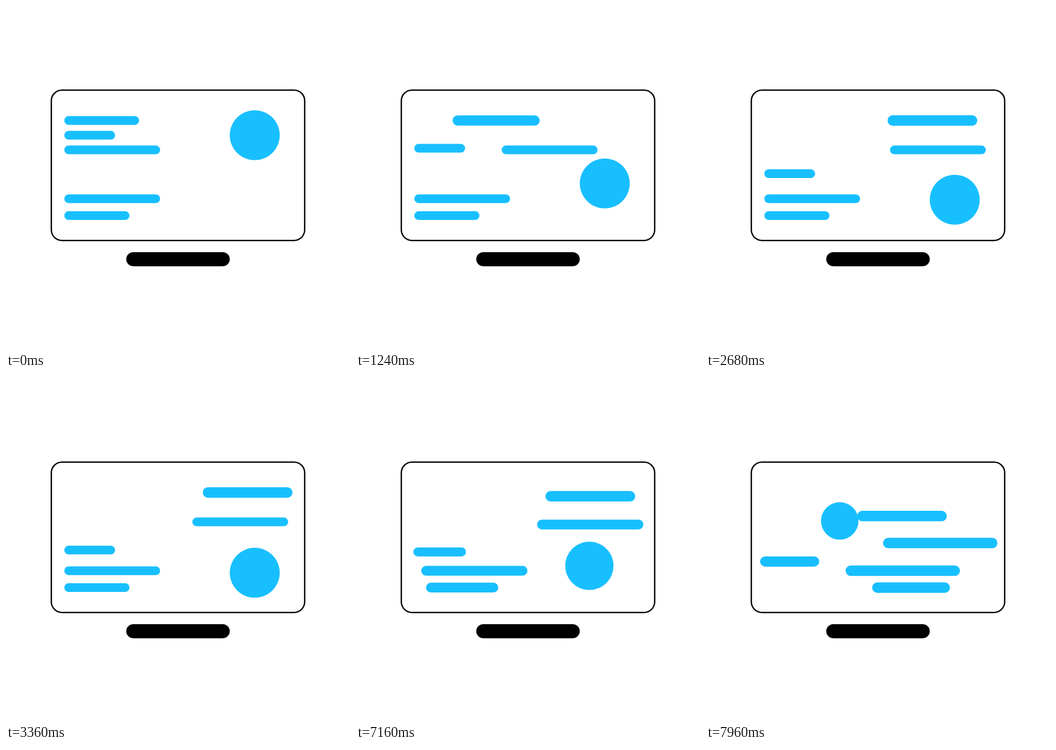
Recreate the animation shown at these times as an HTML page with a canvas. Size 640 by 640 pixels, loop 8000 ms.

```html
<!DOCTYPE html>
<html lang="en">
<head>
<meta charset="utf-8">
<title>Screen layout</title>
<style>
  html, body { margin: 0; width: 100%; height: 100%; overflow: hidden; background: #fff; }
  canvas { display: block; width: 640px; height: 640px; }
</style>
</head>
<body>
<canvas id="stage" width="640" height="640"></canvas>
<script>
const ctx = document.getElementById('stage').getContext('2d');
const LOOP = 8000;
const BLUE = '#18bfff';
const BAR_H = 16.3;

// Five uneven ticks repeat every 560 ms.
const PERIOD = 560;
const TICKS = [0, 120, 260, 300, 440];

function stepAt(ms) {
  const rest = ms % PERIOD;
  return Math.floor(ms / PERIOD) * 5 + TICKS.filter(t => t <= rest).length - 1;
}

// Cubic easing with control points (1/3, 0) and (x2, 1).
function ease(x2) {
  return p => {
    if (p <= 0) return 0;
    if (p >= 1) return 1;
    let lo = 0, hi = 1;
    for (let i = 0; i < 40; i++) {
      const s = (lo + hi) / 2, q = 1 - s;
      const x = q * q * s + 3 * q * s * s * x2 + s * s * s;
      if (x < p) lo = s; else hi = s;
    }
    return lo * lo * (3 - 2 * lo);
  };
}
const even = ease(2 / 3);
const soft = ease(0.08);
const fast = ease(0);

function pill(x, y, w, h) {
  ctx.beginPath();
  ctx.roundRect(x, y, w, h, h / 2);
  ctx.fill();
}

// Bar around its centre; grow 0..1 enlarges it by a fifth.
function bar(cx, cy, width, grow = 0) {
  const k = 1 + 0.2 * grow;
  const w = width * k, h = BAR_H * k;
  pill(cx - w / 2, cy - h / 2, w, h);
}

function drawScreen() {
  ctx.fillStyle = '#fff';
  ctx.fillRect(0, 0, 640, 640);
  ctx.strokeStyle = '#000';
  ctx.lineWidth = 2.5;
  ctx.beginPath();
  ctx.roundRect(84.3, 156.4, 471.4, 279.8, 20);
  ctx.stroke();
  ctx.fillStyle = '#000';
  pill(223.7, 458, 192.6, 26.2);
}

function draw(ms) {
  const step = stepAt(ms);
  const a = step / 30;          // first move
  const b = (step - 60) / 30;   // second move, after the pause
  const evenA = even(a), evenB = even(b);
  const softA = soft(a), softB = soft(b);
  const fastA = fast(a), fastB = fast(b);
  const growB = fast(b * 2);

  drawScreen();
  ctx.fillStyle = BLUE;
  bar(178 + 271.5 * evenA - 278.6 * evenB, 213 + 143.7 * evenB, 139.1, even(a * 2));
  bar(155.7, 240.4 + 79.8 * evenA + 69.6 * evenB, 94.5, even(b * 2));
  bar(197.6 + 238.2 * softA, 267.7 + 57.7 * softB, 178.2, growB);
  bar(197.6 + 229.1 * fastB, 358.6, 178.2, growB);
  bar(169.1 + 288.7 * fastB, 389.9, 121.2, growB);

  ctx.beginPath();
  ctx.arc(462.8 - 290.8 * fastB, 240.4 + 121.9 * fastA - 131 * fastB,
    46.45 - 15.7 * fastB, 0, Math.PI * 2);
  ctx.fill();
}

const start = performance.now();
function tick() {
  draw((performance.now() - start) % LOOP);
  requestAnimationFrame(tick);
}
tick();
</script>
</body>
</html>
```
